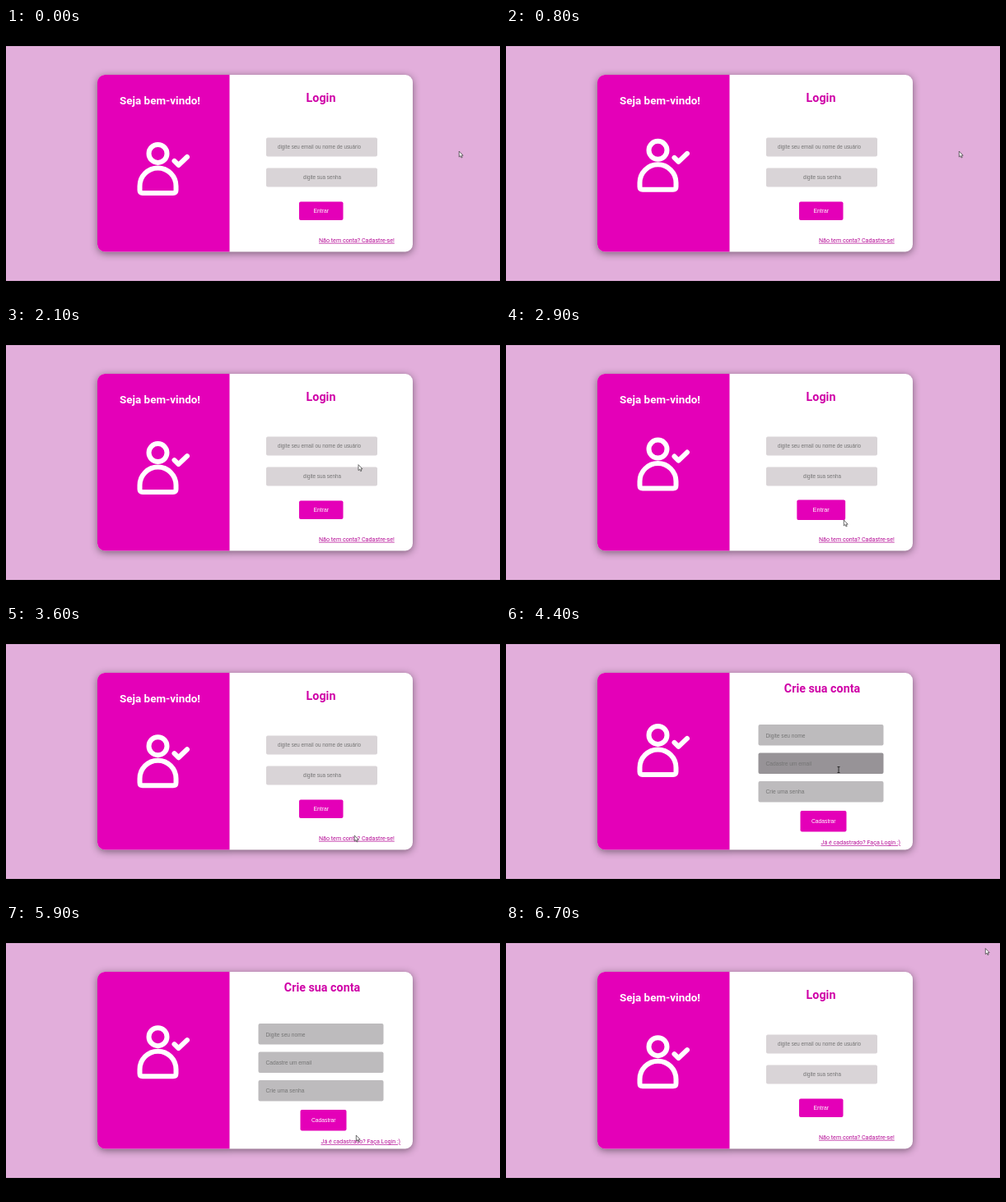
Animation of 600x330 px, one loop 6800 ms. Source, as an HTML page:

```html
<!DOCTYPE html>
<html lang="pt-BR">
<head>
<meta charset="utf-8">
<title>Login</title>
<style>
  html, body { margin: 0; width: 100%; height: 100%; overflow: hidden; background: #000; }
  svg { display: block; width: 600px; height: 330px; }
  text { font-family: "Liberation Sans", Arial, sans-serif; }
  .title { font: bold 14.3px Roboto, sans-serif; fill: #cf00a7; text-anchor: middle; }
  .welcome { font-size: 13.45px; fill: #fff; }
  .field { fill: #d9d4d7; }
  #signup .field { fill: #bdbbbd; }
  #signup .field.hover { fill: #979397; }
  .hint { font-size: 6.3px; fill: #757575; text-anchor: middle; }
  #signup .hint { font-size: 6.65px; text-anchor: start; }
  .button rect { fill: #e400b8; }
  .button text { font-size: 6.75px; fill: #fff; text-anchor: middle; }
  .button { transform-box: fill-box; transform-origin: center; }
  .button.hover { transform: scale(1.1); }
  .link { font: 7.14px Roboto, sans-serif; fill: #b50d96; text-decoration: underline; }
  #card { filter: drop-shadow(0 2px 5px rgba(0, 0, 0, .45)); }
  #icon { fill: none; stroke: #fff; stroke-width: 6; stroke-linecap: round; stroke-linejoin: round; }
</style>
</head>
<body>
<svg viewBox="0 0 600 330">
  <rect y="22" width="600" height="286" fill="#e2aedb"/>
  <g id="card">
    <rect x="111" y="57" width="383" height="215.5" rx="9" fill="#fff"/>
    <path d="M271.5 57H120a9 9 0 0 0-9 9V263.500a9 9 0 0 0 9 9H271.500Z" fill="#e400b8"/>
  </g>

  <g id="icon">
    <circle cx="184.500" cy="14" r="11"/>
    <path d="M162.500 53.500a22 22 0 0 1 44 0v5q0 3.500-3.500 3.500h-37q-3.500 0-3.500-3.500Z"/>
    <path d="M204.500 23l5 5 10.500-10"/>
  </g>

  <g id="login">
    <text class="title welcome" x="187" y="93">Seja bem-vindo!</text>
    <text class="title" x="382.500" y="89.500">Login</text>
    <rect class="field" x="316" y="133.500" width="135" height="23" rx="2"/>
    <text class="hint" x="380.500" y="147.300">digite seu email ou nome de usuário</text>
    <rect class="field" x="316" y="170.500" width="135" height="23" rx="2"/>
    <text class="hint" x="384" y="184">digite sua senha</text>
    <g class="button">
      <rect x="356" y="211.500" width="53.500" height="22.500" rx="2"/>
      <text x="382.700" y="225">Entrar</text>
    </g>
    <text class="link" x="380" y="260.800">Não tem conta? Cadastre-se!</text>
  </g>

  <g id="signup">
    <text class="title" x="384" y="80.500">Crie sua conta</text>
    <rect class="field" x="306.500" y="120" width="152" height="25.500" rx="2"/>
    <text class="hint" x="315.500" y="135.500">Digite seu nome</text>
    <rect class="field" x="306.500" y="154.500" width="152" height="25.500" rx="2"/>
    <text class="hint" x="315.500" y="169.800">Cadastre um email</text>
    <rect class="field" x="306.500" y="189" width="152" height="25.500" rx="2"/>
    <text class="hint" x="315.500" y="204.300">Crie uma senha</text>
    <g class="button">
      <rect x="357.500" y="225" width="56" height="25.500" rx="2"/>
      <text x="385.700" y="240.200">Cadastrar</text>
    </g>
    <text class="link" x="382.500" y="266">Já é cadastrado? Faça Login :)</text>
  </g>

  <path id="arrow" d="M.3 0V7L1.900 5.600 3 8 4.200 7.500 3.100 5.200H5.200Z" fill="#fff" stroke="#333" stroke-width=".7"/>
  <path id="beam" d="M-1.500-3.500H1.500M0-3.500V3.500M-1.500 3.500H1.500" stroke="#222" stroke-width=".9"/>
</svg>

<script>
const LOOP = 6800, STEP = 100;
const SIGNUP_AT = 3950, LOGIN_AT = 6080;
const BOB_PERIOD = 2080, BOB_HEIGHT = 9;

// Pointer stops: time, x, y
const route = [
  [0, 550, 150], [1000, 550, 150], [1400, 475, 143], [1500, 441, 138],
  [1900, 436, 150], [2500, 404, 218], [2900, 410, 235], [3200, 413, 240],
  [3600, 423, 255], [4000, 423, 255], [4400, 404, 175], [4600, 405, 168],
  [5000, 420, 238], [5200, 425, 256], [6300, 425, 256], [6700, 582, 28.5]
];

const $ = id => document.getElementById(id);
const show = (el, on) => el.style.display = on ? '' : 'none';
const move = (el, x, y) => el.setAttribute('transform', `translate(${x} ${y})`);

function pointerAt(t) {
  const i = route.findIndex(stop => stop[0] > t);
  if (i < 0) return route.at(-1).slice(1);
  const [t0, x0, y0] = route[i - 1], [t1, x1, y1] = route[i];
  const k = (t - t0) / (t1 - t0), e = k * k * (3 - 2 * k);
  return [x0 + (x1 - x0) * e, y0 + (y1 - y0) * e];
}

function inside(rect, x, y, grow = 0) {
  const [left, top, w, h] = ['x', 'y', 'width', 'height'].map(n => +rect.getAttribute(n));
  return x >= left - grow && x <= left + w + grow && y >= top - grow && y <= top + h + grow;
}

function draw(t) {
  const signup = t >= SIGNUP_AT && t < LOGIN_AT;
  const page = signup ? $('signup') : $('login');
  show($('signup'), signup);
  show($('login'), !signup);

  // The icon's bobbing restarts with each page
  const since = t < SIGNUP_AT ? t - 230 : t - (signup ? SIGNUP_AT : LOGIN_AT);
  const lift = BOB_HEIGHT * (1 - Math.cos(2 * Math.PI * since / BOB_PERIOD)) / 2;
  move($('icon'), 0, (signup ? 122.5 : 140) - lift);

  const [x, y] = pointerAt(t);
  let typing = false;
  for (const field of page.querySelectorAll('.field')) {
    const over = inside(field, x, y);
    field.classList.toggle('hover', over);
    typing ||= over;
  }
  const button = page.querySelector('.button');
  button.classList.toggle('hover', inside(button.firstElementChild, x, y, 1.2));

  show($('beam'), typing);
  show($('arrow'), !typing);
  move($('beam'), x, y);
  move($('arrow'), x, y);
}

const start = performance.now();
function tick() {
  const t = (performance.now() - start) % LOOP;
  draw(Math.floor(t / STEP) * STEP);
  requestAnimationFrame(tick);
}
tick();
</script>
</body>
</html>
```
